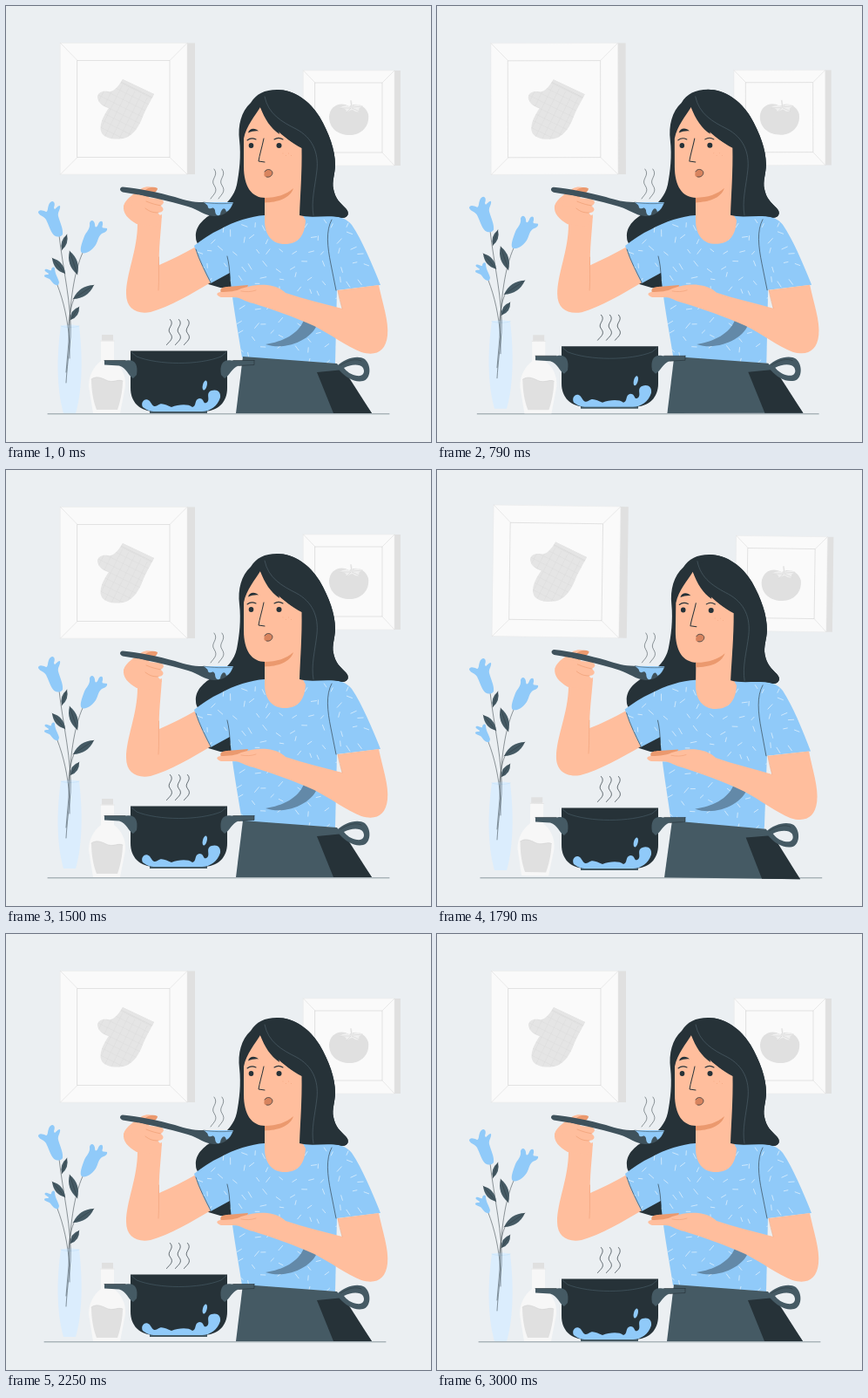
Write an HTML page with a canvas that moves like this. It is 488x500 px and loops after 3040 ms.

```html
<!DOCTYPE html>
<html lang="en">
<head>
<meta charset="utf-8">
<title>Tasting the soup</title>
<style>
html, body { margin: 0; width: 100%; height: 100%; overflow: hidden; background: #ebeff2; }
canvas { display: block; width: 488px; height: 500px; }
</style>
</head>
<body>
<canvas id="stage"></canvas>
<script>
const W = 488, H = 500, LOOP = 3040, FPS = 24;
const INK = '#263238', SLATE = '#455a64', BLUE = '#90caf9', SKIN = '#ffbe9d', SHADE = '#eb996e';
const PALE = '#fafafa', GREY = '#e0e0e0';

const canvas = document.getElementById('stage');
const ctx = canvas.getContext('2d');
const dpr = window.devicePixelRatio || 1;
canvas.width = W * dpr;
canvas.height = H * dpr;

const paths = {};
const path = d => paths[d] || (paths[d] = new Path2D(d));

function fill(d, color) {
  ctx.fillStyle = color;
  ctx.fill(path(d), 'evenodd');
}

function line(d, color = INK, width = 0.6) {
  ctx.strokeStyle = color;
  ctx.lineWidth = width;
  ctx.stroke(path(d));
}

function oval(x, y, rx, ry, color, turn = 0) {
  ctx.beginPath();
  ctx.ellipse(x, y, rx, ry, turn, 0, Math.PI * 2);
  ctx.fillStyle = color;
  ctx.fill();
}

function group(move, draw) {
  ctx.save();
  move();
  draw();
  ctx.restore();
}

// Linear keyframes: [phase, value] pairs
function track(keys, p) {
  let i = 1;
  while (i < keys.length - 1 && p > keys[i][0]) i++;
  const [p0, v0] = keys[i - 1], [p1, v1] = keys[i];
  return v0 + (v1 - v0) * (p - p0) / (p1 - p0);
}

const WIND = [[0, 0], [0.25, 1], [0.75, -1], [1, 0]];
const SHAKE = [[0, 0], [0.1, -1], [0.2, 2], [0.3, -4], [0.4, 4], [0.5, -4],
  [0.6, 4], [0.7, -4], [0.8, 2], [0.9, -1], [1, 0]];
const FLOAT = [[0, 0], [0.5, -10], [1, 0]];

function frame(x, y, r, b, side, ix, iy, ir, ib) {
  fill(`M${r} ${y}H${r + side}V${b}H${r}Z`, GREY);
  fill(`M${x} ${y}H${r}V${b}H${x}Z`, PALE);
  line(`M${x} ${y}H${r}V${b}H${x}Z`, '#e8e8e8', 0.5);
  line(`M${ix} ${iy}H${ir}V${ib}H${ix}Z`, '#c8c8c8', 0.5);
  line(`M${x} ${y}L${ix} ${iy}M${r} ${y}L${ir} ${iy}M${x} ${b}L${ix} ${ib}M${r} ${b}L${ir} ${ib}`, '#d6d6d6', 0.5);
}

const MITT = 'M134 84L170 101C165 111 160 119 157 127C153 138 147 147 138 151C128 154 115 153 110 146' +
  'C106 138 111 127 118 117C111 115 106 111 105 105C105 99 111 97 117 98C123 99 128 94 134 84Z';

function mitt() {
  fill(MITT, '#e5e5e5');
  group(() => {
    ctx.clip(path(MITT));
    ctx.translate(138, 118);
    ctx.rotate(0.46);
  }, () => {
    for (let k = -40; k <= 40; k += 8) line(`M${k} -22V50M-50 ${k}H50`, '#d8d8d8', 0.4);
    fill('M-24 -40H34V-25H-24Z', '#e5e5e5');
    line('M-24 -25H34', '#d4d4d4', 0.5);
  });
}

function tomato() {
  fill('M394 115C402 110 413 114 416 124C418 138 408 148 395 148C381 148 371 140 371 127C372 114 384 109 394 115Z', GREY);
  fill('M396 116C391 113 387 114 383 117C388 117 391 118 391 122C394 120 396 119 398 119C400 121 403 122 406 121C404 118 406 116 410 115C405 112 401 113 398 115L397 108H395Z', '#efefef');
  line('M396 109L397 116M384 117L396 117L391 122M397 117L406 121M398 116L409 115', '#cfcfcf', 0.5);
}

function bottle() {
  fill('M109 383H124V407C132 413 138 423 137 436L131 467H100L95 436C95 423 101 413 109 407Z', '#f7f7f7');
  fill('M110 377H123V383.5H110Z', GREY);
  fill('M98 428C103 424 109 426 115 429C123 433 129 427 134 430C134 441 131 455 128 463H104C100 453 98 440 98 428Z', GREY);
  line('M109 384H124M98 428C103 424 109 426 115 429C123 433 129 427 134 430', '#cccccc', 0.5);
}

function leaf(x1, y1, x2, y2, w) {
  const mx = (x1 + x2) / 2, my = (y1 + y2) / 2, len = Math.hypot(x2 - x1, y2 - y1);
  const nx = (y1 - y2) / len * w, ny = (x2 - x1) / len * w;
  fill(`M${x1} ${y1}Q${mx + nx} ${my + ny} ${x2} ${y2}Q${mx - nx} ${my - ny} ${x1} ${y1}Z`, SLATE);
  line(`M${x1} ${y1}L${x2} ${y2}`, INK, 0.4);
}

function vase() {
  fill('M63 367C68 365 79 365 84 367C88 400 88 440 80 467H66C58 440 58 400 63 367Z', '#dbedfd');
  line('M63 367C68 369 79 369 84 367', '#c0dff8', 0.6);
  line('M61 263C65 300 76 345 74 380C72 400 70 415 69 432M88 283C78 305 73 340 72 385L69 420' +
    'M59 320C66 338 71 360 73 385L73 404M79 334C75 342 73 352 72 366', INK, 0.5);
  leaf(70, 262, 64, 280, 6);
  leaf(53, 289, 68, 307, 8);
  leaf(73, 281, 82, 308, 9);
  leaf(77, 336, 101, 320, 9);
  leaf(84, 345, 74, 360, 7);
  fill('M57 264C52 262 50 253 46 245C44 241 39 241 37 237C37 233 42 234 46 236C49 236 47 229 51 225C55 222 57 227 55 231C56 236 58 229 62 229C63 233 59 236 60 241C62 248 66 256 65 262C63 265 60 265 57 264Z', BLUE);
  fill('M87 283C84 280 87 272 90 264C92 259 97 256 96 249C97 245 101 245 102 250C102 256 105 253 106 250C108 245 112 246 111 251C109 256 113 254 116 255C117 258 113 260 110 261C106 264 106 268 104 272C101 279 92 285 87 283Z', BLUE);
  fill('M60 320C56 321 53 317 51 314C48 311 44 312 44 309C45 307 49 309 49 307C47 305 43 304 45 302C48 301 50 304 52 303C52 300 55 298 56 301C56 307 60 312 61 317Z', BLUE);
}

function steam(count, x, y, gap, h, width) {
  for (let i = 0; i < count; i++) {
    const a = x + i * gap;
    line(`M${a + 3} ${y}C${a + 9} ${y + h * 0.22} ${a - 2} ${y + h * 0.34} ${a + 3} ${y + h * 0.55}` +
      `S${a + 2} ${y + h * 0.86} ${a - 1} ${y + h}`, INK, width);
  }
}

function pot() {
  steam(3, 185.5, 359.5, 10, 29, 0.7);
  fill('M165 463H231V467H165Z', SLATE);
  fill('M143 395.5H254V438C254 454 244 465 225 465H172C153 465 143 454 143 438Z', INK);
  line('M144 397L150 402C175 412 222 412 247 402L253 397', SLATE, 0.7);
  fill('M113 406.5H138C148 404.5 152 411 150 423L146 427C140 424 139 415 130 412.5L113 411.5Z', SLATE);
  fill('M285 406.5H259C249 404.5 245 411 247 423L251 427C257 424 259 415 267 412.5L285 411.5Z', SLATE);
  line('M113 406.5H137M285 406.5H261M285 406.5V411.5L267 412.5', INK, 0.6);
  fill('M157 460C154 454 160 448 165 453C168 457 169 461 174 458C179 454 184 458 190 460C198 457 209 456 214 460C219 459 216 451 222 450C228 450 226 457 230 455C236 452 228 444 236 441C242 439 247 442 246 449C243 459 234 465 225 465H172C165 465 161 463 157 460Z', BLUE);
  oval(228.3, 435, 2.4, 5.6, BLUE, 0.25);
}

const SHIRT = 'M297 240C281 241 262 247 246 256C235 261 225 268 216 275C221 290 228 305 235 318L257 306' +
  'C259 335 266 370 271 403L378 410L380 326L430 320C420 295 409 269 397 251C391 244 385 242 376 241L343 239Z';

function random(seed) {
  return () => (seed = (seed * 16807) % 2147483647) / 2147483647;
}

const rnd = random(77), ticks = [];
for (let y = 244; y < 412; y += 16)
  for (let x = 214; x < 434; x += 16)
    ticks.push([x + rnd() * 12, y + rnd() * 12, rnd() * Math.PI, 2.2 + rnd() * 1.5]);

function shirt() {
  fill(SHIRT, BLUE);
  group(() => ctx.clip(path(SHIRT)), () => {
    for (const [x, y, a, r] of ticks) {
      const dx = Math.cos(a) * r, dy = Math.sin(a) * r;
      ctx.beginPath();
      ctx.moveTo(x - dx, y - dy);
      ctx.lineTo(x + dx, y + dy);
      ctx.strokeStyle = '#e3f2fd';
      ctx.lineWidth = 0.75;
      ctx.stroke();
    }
  });
  line('M254 287C256 295 257 303 257 312M218 279C222 292 229 305 235 317M374 245C367 258 369 276 373 296L379 326');
  fill('M298 388C318 385 336 376 342 360L358 363C353 382 322 396 298 388Z', '#6389a8');
}

function apron() {
  fill('M272 402L380 410L386 418L420 467H264Z', SLATE);
  fill('M357 420L388 417L420 467H376Z', INK);
  fill('M380 413C389 404 404 400 412 405C420 412 419 428 410 430C400 432 390 426 383 418Z' +
    'M388 415C396 411 406 410 410 415C413 421 409 425 403 424C396 423 391 419 388 415Z', SLATE);
  line('M384 412C393 406 402 404 408 407', INK, 0.5);
}

// Outer right edge, shared by both layers of hair
const CROWN = 'M311 96C331 96 349 109 360 127C371 146 378 165 378 182C378 192 374 201 376 210C378 221 384 226 390 232C395 237 393 243 386 243';

function hairBack() {
  fill(CROWN + 'L300 262L223 275C220 273 218 270 218 265C217 252 228 242 244 234C254 226 262 218 265 205C268 190 270 172 268 154' +
    'C266 137 270 121 281 111C287 101 297 96 311 96Z', INK);
  fill('M229 318L258 304L262 325L246 323Z', INK);
}

function hairSide() {
  fill(CROWN + 'C370 239 350 244 337 240C338 215 340 190 339.500 163C328 157 319 150 313 142L314 147C304 140 297 130 292 116Z', INK);
  line('M297 104C301 124 317 133 333 141C352 151 359 168 357 188C355 207 350 224 353 240', '#52666f', 0.6);
}

function face() {
  fill('M297 210V246C297 263 306 273 320 273C336 273 343 263 344 246L338 235L341 163Z', SKIN);
  fill('M292 116C286 126 276 137 273 152V184C273 207 282 220 298 220C316 220 333 211 339 196L341 163C315 150 300 133 292 116Z', SKIN);
  fill('M297 220C311 220 322 216 330 209C326 221 312 225 297 225.500Z', SHADE);
  fill('M278 145.500C279 140 286 139 290 143.500C286 143 282 144 278 145.500Z', INK);
  line('M277 154C280 151.500 284 151.500 287 153M308 153C311 151 315 151 318 153', INK, 1.1);
  oval(281.500, 160, 2.800, 3, INK);
  oval(313.500, 160, 3, 3, INK);
  line('M296 152C294 162 291 171 290 178L297 179', INK, 1);
  fill('M297 190C299 186 305 187 306 191C306 195 302 197 299 196C296 196 296 193 297 190Z', '#d8845e');
  line('M297 190C299 186 305 187 306 191C306 195 302 197 299 196', INK, 0.7);
  for (let i = 0; i < 4; i++) oval(318 + i * 3.2, 169 + (i % 2) * 2.5, 0.4, 0.4, SHADE);
}

function leftArm() {
  fill('M218 276C204 284 190 291 176 297C175 280 178 258 179 239L151 250C151 280 138 307 138 330C138 347 150 354 166 351C188 345 213 330 237 316Z', SKIN);
  line('M175.500 288C175 301 176 313 175 326', SHADE, 0.5);
}

function spoon() {
  fill('M150 250C140 244 134 238 135 229C138 220 148 215 156 209C162 206 169 207 173 211L164 220L176 221C183 223 182 227 177 229C183 232 181 237 174 237L179 242L172 253Z', SKIN);
  fill('M157 214C161 209 168 206 174 209C174 213 168 216 162 219Z', SHADE);
  fill('M134 207.500C152 209 176 214 194 219C207 223 214 225 226 225L261 226C258 235 250 241 239 241C227 240 222 234 209 230C186 223 158 217 134 213.500C130 212 130 208 134 207.500Z', '#3f525c');
  fill('M227 225H261C259 230 257 234 253 236C251 229 247 233 246 239C243 242 240 239 240 234C237 228 235 235 232 231C232 228 229 227 227 225Z', BLUE);
  line('M227 225C237 227 252 227 261 226', SLATE, 0.6);
  fill('M146 219C151 215 157 217 162 220L160 229L144 229Z', SKIN);
  line('M161 224C168 227 173 228 178 229M160 232C165 236 169 237 175 237', SHADE, 0.6);
  steam(2, 236, 187, 9, 34, 0.5);
}

function rightArm() {
  fill('M247 329C244 322 252 322 260 321.500L278 320L274 330Z', SHADE);
  fill('M381 326L428 320C432 340 440 362 438 378C436 396 425 402 408 397C392 391 372 376 354 367C330 356 303 347 284 341' +
    'C274 339 269 334 262 334L247 334C241 332 241 329 246 328C256 328 265 327 270 324C281 320 292 319 300 320C309 321 316 324 321 329C342 336 364 341 386 347Z', SKIN);
  line('M386 347C384 340 382 333 381 326M270 327C276 328 281 328 287 326', SHADE, 0.5);
}

function woman() {
  hairBack();
  leftArm();
  shirt();
  face();
  hairSide();
  apron();
  rightArm();
  spoon();
}

function draw(ms) {
  const step = Math.floor(ms * FPS / 1000 + 0.15);
  const time = step / FPS;
  const slow = time / 3 % 1, quick = time / 1.5 % 1;
  const lift = track(FLOAT, slow);
  const angle = track(WIND, quick) * Math.PI / 180;
  const sway = () => {
    ctx.translate(W / 2, H / 2);
    ctx.rotate(angle);
    ctx.translate(-W / 2, -H / 2);
  };
  const rise = () => ctx.translate(0, lift);

  ctx.setTransform(dpr, 0, 0, dpr, 0, 0);
  ctx.lineCap = ctx.lineJoin = 'round';
  ctx.fillStyle = '#ebeff2';
  ctx.fillRect(0, 0, W, H);

  group(sway, () => {
    frame(62.5, 42.5, 208, 193, 9, 82, 62.5, 188, 173.5);
    mitt();
    frame(341.5, 74, 446, 183, 7, 355, 88, 432, 168);
    tomato();
  });
  group(() => ctx.translate(track(SHAKE, quick), 0), () => line('M48 467.800H440', '#64747c', 0.7));
  group(rise, vase);
  group(sway, () => {
    bottle();
    woman();
  });
  group(rise, pot);
}

const start = performance.now();
function tick() {
  draw((performance.now() - start) % LOOP);
  requestAnimationFrame(tick);
}
tick();
</script>
</body>
</html>
```
